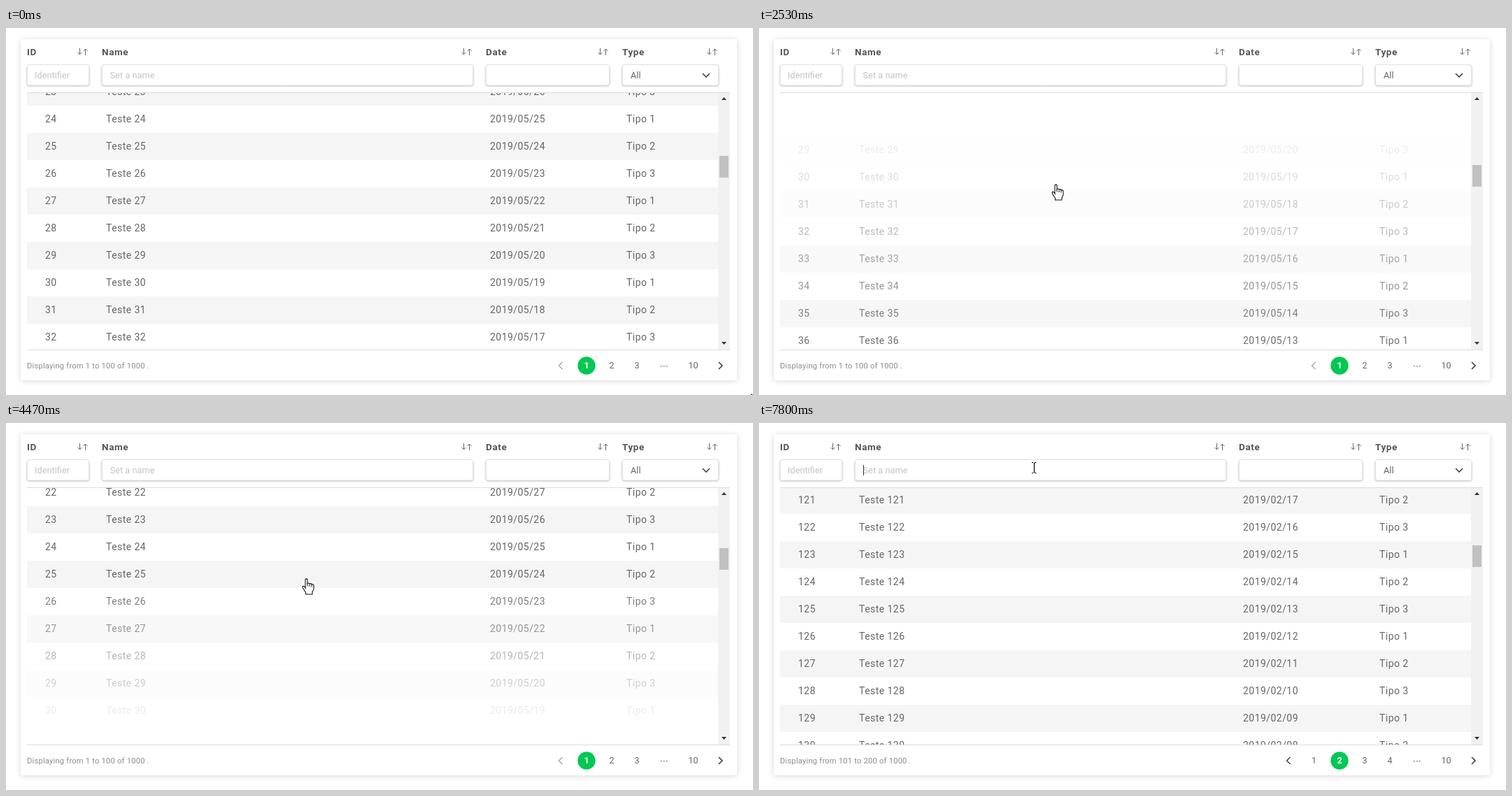
Animation, 1068 px wide and 525 px high, one loop 8000 ms. Source, as an HTML page with a canvas:

```html
<!DOCTYPE html>
<html lang="en">
<head>
<meta charset="utf-8">
<title>Scrolling data table</title>
<style>
html, body { margin: 0; width: 100%; height: 100%; overflow: hidden; background: #fff; }
canvas { display: block; }
</style>
</head>
<body>
<canvas id="stage" width="1068" height="525"></canvas>
<script>
const ctx = document.getElementById('stage').getContext('2d');
const LOOP = 8000, STEP = 200 / 3;
const LEFT = 30, RIGHT = 1018, TOP = 93, BOTTOM = 460, ROW = 39;
const PAGE_TURN = 5200, FOCUS = 7600;
const FADE_LAG = 60, FADE = 300;
const HOVER_LAG = 150, HOVER_SPEED = .65;

// Scroll gestures: [start, end, destination, ease-out power]
const START_SCROLL = 879.5;
const glides = [
  [1000, 2050, 1505, 1],
  [2100, 2950, 575, 1],
  [3060, 3700, 413, 1],
  [3884, 4560, 900, 1],
  [PAGE_TURN, 6080, 0, 1.5],
  [6428, 7200, 782.5, 1]
];
// Pointer stops: [time, x, y]
const stops = [
  [130, 1066, 523.5], [800, 293, 147], [1100, 400, 212], [1733, 422, 220], [3267, 426, 225],
  [4467, 429, 222], [5000, 845, 501], [5733, 858, 488], [5850, 858, 488], [6200, 830, 264],
  [6467, 830, 264], [7200, 576, 192], [7530, 393, 64]
];

const clamp01 = v => Math.max(0, Math.min(1, v));

function scrollAt(t) {
  let scroll = START_SCROLL;
  for (const [start, end, to, power] of glides) {
    const left = (1 - clamp01((t - start) / (end - start))) ** power;
    scroll = to + (scroll - to) * left;
  }
  return scroll;
}

function pointerAt(t) {
  let [, x, y] = stops[0];
  for (let i = 1; i < stops.length; i++) {
    const [time, nx, ny] = stops[i], before = stops[i - 1][0];
    const p = clamp01((t - before) / (time - before));
    x += (nx - x) * p;
    y += (ny - y) * p;
  }
  return [x, y];
}

const overRows = (x, y) => x > LEFT && x < RIGHT && y > TOP && y < BOTTOM;

function text(str, x, y, { size = 14, weight = 400, color = '#666', spacing = 0, align = 'left' } = {}) {
  ctx.font = `${weight} ${size}px Roboto, sans-serif`;
  ctx.letterSpacing = spacing + 'px';
  ctx.fillStyle = color;
  ctx.textAlign = align;
  ctx.fillText(str, x, y);
}

function rect(x, y, w, h, color) {
  ctx.fillStyle = color;
  ctx.fillRect(x, y, w, h);
}

function stroke(d, color, width = 1) {
  ctx.strokeStyle = color;
  ctx.lineWidth = width;
  ctx.stroke(new Path2D(d));
}

function panel(x, y, w, h, blur, shadow) {
  ctx.save();
  ctx.shadowColor = shadow;
  ctx.shadowBlur = blur;
  ctx.shadowOffsetY = 1;
  ctx.fillStyle = '#fff';
  ctx.beginPath();
  ctx.roundRect(x, y, w, h, 3);
  ctx.fill();
  ctx.restore();
}

function field(x, right) {
  panel(x, 53, right - x + 1, 29, 3, 'rgba(0,0,0,.3)');
  ctx.strokeStyle = '#e2e2e2';
  ctx.lineWidth = 1;
  ctx.beginPath();
  ctx.roundRect(x + .5, 52.5, right - x, 29.5, 3);
  ctx.stroke();
}

function header() {
  const columns = [['ID', 30, 118], ['Name', 137, 667], ['Date', 686, 862], ['Type', 881, 1018]];
  for (const [title, x, right] of columns) {
    text(title, x, 39, { size: 13.5, weight: 700, color: '#555', spacing: .6 });
    const c = right - 8.5;
    stroke(`M${c - 4} 29V38M${c - 7} 35l3 3l3-3M${c + 4} 39V30M${c + 1} 33l3-3l3 3`, '#666');
    field(x, right);
  }
  const hint = { size: 12.8, color: '#c4c4c4' };
  text('Identifier', 41, 72, hint);
  text('Set a name', 148.5, 72, hint);
  text('All', 893, 72, { size: 12.8 });
  stroke('M996 65l5 5l5-5', '#444', 1.6);
}

// Time since a row last came into view decides how far it has faded in.
function rowAlpha(index, t) {
  const since = t >= PAGE_TURN ? PAGE_TURN : 0;
  for (let age = 0; age < FADE_LAG + FADE; age += 5) {
    const past = t - age;
    if (past < 0) return 1;
    const y = TOP + index * ROW - scrollAt(past);
    if (past < since || y > BOTTOM || y + ROW < TOP) return clamp01((age - FADE_LAG) / FADE);
  }
  return 1;
}

// The highlight trails the pointer and is skipped while scrolling fast.
function hoverAlpha(index, t) {
  const samples = 10;
  let hits = 0;
  for (let i = 0; i < samples; i++) {
    const past = t - HOVER_LAG - i * 10;
    const [x, y] = pointerAt(past), scroll = scrollAt(past);
    const speed = Math.abs(scroll - scrollAt(past - 10)) / 10;
    const under = Math.floor((y - TOP + scroll) / ROW);
    if (overRows(x, y) && speed < HOVER_SPEED && under === index) hits++;
  }
  return hits / samples;
}

function dateOf(id) {
  return new Date(Date.UTC(2019, 5, 18 - id)).toISOString().slice(0, 10).replace(/-/g, '/');
}

function rows(t, page) {
  const scroll = Math.floor(scrollAt(t)), first = Math.floor(scroll / ROW);
  ctx.save();
  ctx.beginPath();
  ctx.rect(LEFT, TOP, RIGHT - LEFT, BOTTOM - TOP);
  ctx.clip();
  for (let i = first; i < first + 11; i++) {
    const id = page * 100 + i + 1, y = TOP + i * ROW - scroll;
    const alpha = rowAlpha(i, t);
    ctx.globalAlpha = alpha;
    if (id % 2) rect(LEFT, y, RIGHT - LEFT, ROW, '#f5f5f5');
    ctx.globalAlpha = alpha * hoverAlpha(i, t);
    rect(LEFT, y, RIGHT - LEFT, ROW, '#e7e7e7');
    ctx.globalAlpha = alpha;
    const cells = [[id, 56], ['Teste ' + id, 143], [dateOf(id), 692], ['Tipo ' + (id % 3 + 1), 887]];
    for (const [value, x] of cells) text(value, x, y + 24, { spacing: .45 });
  }
  ctx.restore();

  rect(RIGHT, TOP, 17, BOTTOM - TOP, '#f1f1f1');
  rect(1020, Math.round(107.9 + scroll * .0855), 13, 31, '#c1c1c1');
  ctx.fillStyle = '#333';
  ctx.fill(new Path2D('M1023 103h7l-3.5-4zM1023 449h7l-3.5 4z'));
  for (const y of [92, 460]) rect(LEFT, y, 1005, 1, '#dcdcdc');
}

function footer(page, [px, py]) {
  text(`Displaying from ${page * 100 + 1} to ${page * 100 + 100} of 1000 .`, 30, 487,
    { size: 11.2, color: '#8c8c8c', spacing: .2 });
  const numbers = page ? [[1, 793.5], [2, 830], [3, 866], [4, 902]] : [[1, 830], [2, 866], [3, 902]];
  for (const [n, x] of [...numbers, [10, 982.5]]) {
    const active = n === page + 1;
    const lit = active || Math.hypot(px - x, py - 483) < 13;
    if (lit) {
      ctx.fillStyle = active ? '#00c853' : '#5b5c60';
      ctx.beginPath();
      ctx.arc(x, 483, 12.7, 0, 7);
      ctx.fill();
    }
    text(n, x, 487, { size: 12.5, weight: lit ? 700 : 400, color: lit ? '#fff' : '#666', align: 'center' });
  }
  for (const x of [936, 940, 944]) rect(x, 483, 1.5, 1.5, '#777');
  stroke(`M${page ? 759.5 : 795.5} 478l-5 5l5 5`, page ? '#444' : '#aaa', 1.5);
  stroke('M1019 478l5 5l-5 5', '#444', 1.7);
}

const HAND = 'M-1.5 1.5Q0-.8 1.5 1.5V7Q3 5.8 4.5 7.5Q6.2 6.5 7.5 8.3Q9.6 7.7 10.5 10V14Q10.5 17 8.5 19V22.5H-1V20' +
  'L-5 13.5Q-6.2 11-4.3 10.8Q-2.7 11-1.5 13.5Z';
const ARROW = 'M0 0V16L4 12.5L6.5 18.5L9 17.5L6.5 11.5H11.5Z';

function pointer([x, y]) {
  const inField = y > 52 && y < 82;
  const hand = overRows(x, y) || (x > 740 && x < 1035 && Math.abs(y - 483) < 13);
  ctx.save();
  ctx.translate(Math.round(x), Math.round(y));
  if (inField) {
    stroke('M-3-7.5h2.5M1 -7.5h2.5M.5-7V7M-3 7.5h2.5M1 7.5h2.5', '#000', 1.2);
  } else {
    const shape = hand ? HAND : ARROW;
    if (hand) ctx.translate(.5, .5);
    ctx.fillStyle = '#fff';
    ctx.fill(new Path2D(shape));
    stroke(shape, '#111', 1.1);
    if (hand) stroke('M1.5 7V11M4.5 8V11.5M7.5 8.5V12', '#111');
  }
  ctx.restore();
}

function draw(t) {
  const page = t >= PAGE_TURN ? 1 : 0, spot = pointerAt(t);
  rect(0, 0, 1068, 525, '#fff');
  panel(21, 16, 1024, 488, 8, 'rgba(0,0,0,.16)');
  header();
  rows(t, page);
  footer(page, spot);
  if (t >= FOCUS) rect(149, 60, 1, 15, '#333');
  pointer(spot);
}

const began = performance.now();
function tick() {
  const t = (performance.now() - began) % LOOP;
  draw(Math.floor((t + 4) / STEP) * STEP % LOOP);
  requestAnimationFrame(tick);
}
tick();
</script>
</body>
</html>
```
